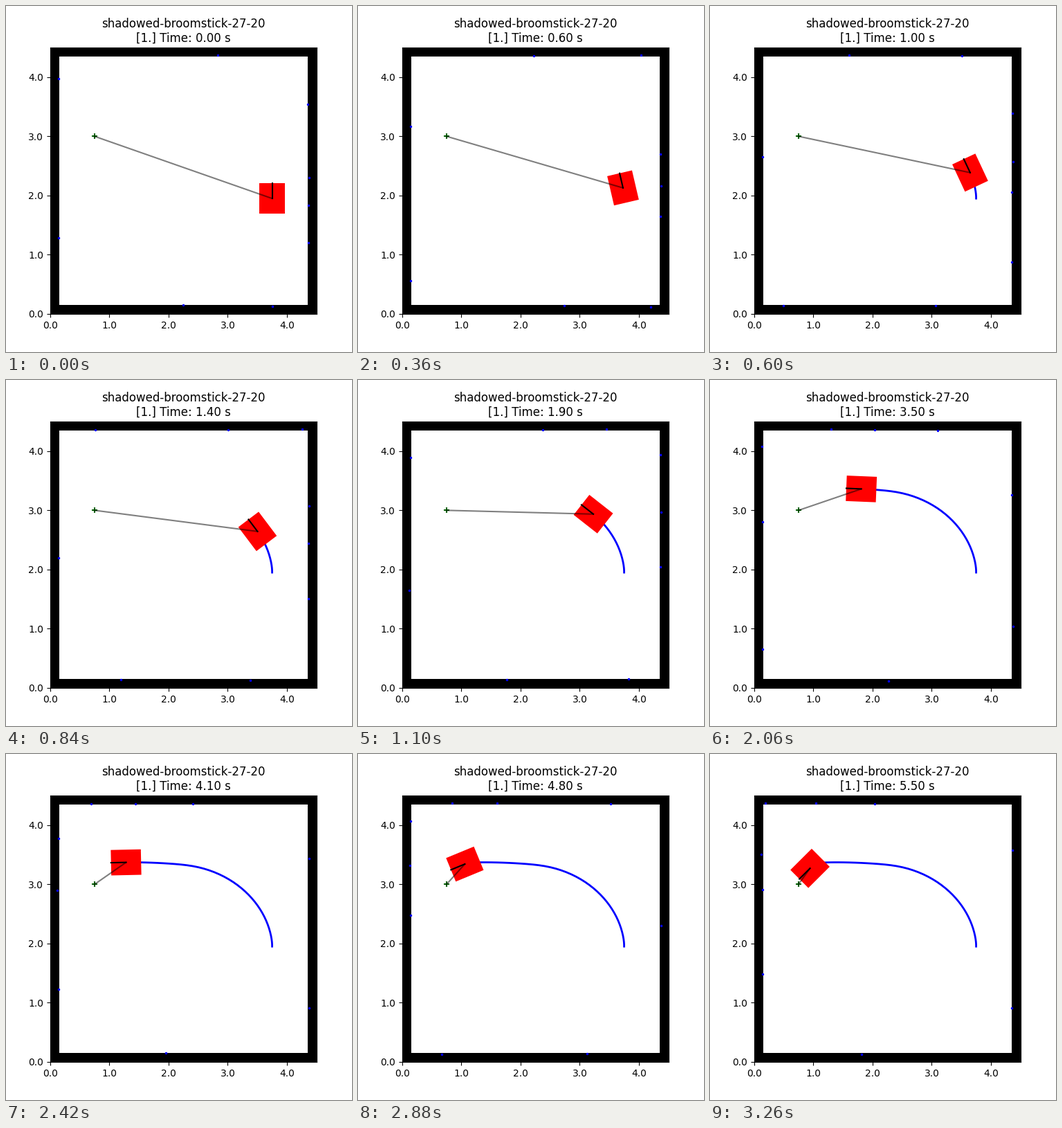
These frames come from a looping animation (500x500 px, 3280 ms). A matplotlib script:

```python
import numpy as np
import matplotlib.pyplot as plt
from matplotlib.animation import FuncAnimation
from matplotlib.patches import Polygon, Rectangle

ARENA, WALL = 4.5, 0.15
LENGTH, WIDTH = 0.508, 0.43
START, GOAL = np.array([3.75, 1.95]), np.array([0.75, 3.0])
STEPS, DT = 56, 0.1
TICK_MS, LOOP_MS = 20, 3280


def speed(t):
    """Pull away at 1 m/s², cruise up to 1 m/s, brake to a crawl."""
    return np.interp(t, [0, 0.66, 3, 3.72, 4.525], [0, 0.66, 1, 1, 0.195])


def turn_rate(t):
    """Degrees per second: steady left turn, nearly straight, left again."""
    return np.interp(t, [0, 0.32, 2.8, 3.2, 4.1, 4.2], [0, 29.8, 29.8, 6, 6, 32.1])


def drive():
    """Euler steps of a unicycle; each step moves along the heading before it."""
    mid = (np.arange(STEPS - 1) + 0.5) * DT
    turns = np.append(0, np.cumsum(turn_rate(mid) * DT))
    heading = np.radians(90 + turns)
    ahead = np.stack([np.cos(heading), np.sin(heading)], axis=1)
    moves = ahead[:-1] * (speed(mid) * DT)[:, None]
    path = START + np.vstack([np.zeros(2), np.cumsum(moves, axis=0)])
    return path, heading


path, heading = drive()
BEAMS = np.pi + np.radians(39.78) * np.arange(-4, 5)


def lidar(pos, a, k):
    """Points where the beams end, slightly inside the walls."""
    d = np.stack([np.cos(a + BEAMS), np.sin(a + BEAMS)], axis=1)
    limit = np.where(d > 0, ARENA - WALL, WALL)
    reach = ((limit - pos) / d).min(axis=1)
    reach += np.random.default_rng(k).uniform(0, 0.03, len(BEAMS))
    return pos + d * reach[:, None]


fig, ax = plt.subplots(figsize=(5, 5), dpi=100)
ax.set_aspect("equal")
ax.set(xlim=(0, ARENA), ylim=(0, ARENA), xticks=range(5), yticks=range(5))
ax.xaxis.set_major_formatter("{x:.1f}")
ax.yaxis.set_major_formatter("{x:.1f}")

for edge in (0, ARENA - WALL):
    ax.add_patch(Rectangle((0, edge), ARENA, WALL, color="k", lw=0))
    ax.add_patch(Rectangle((edge, 0), WALL, ARENA, color="k", lw=0))

trail, = ax.plot([], [], "b", lw=2, zorder=1.2)
body = ax.add_patch(Polygon(np.zeros((4, 2)), fc="r", lw=0, zorder=1.5))
ax.plot(*GOAL, "+", color="darkgreen", ms=6, mew=1.5)
to_goal, = ax.plot([], [], "k", lw=1.5, alpha=0.5)
nose, = ax.plot([], [], "k", lw=1.5)
hits, = ax.plot([], [], "bo", ms=1.5)
title = ax.set_title("")

CORNERS = np.array([[1, 1], [-1, 1], [-1, -1], [1, -1]]) * [LENGTH / 2, WIDTH / 2]


def step_at(ms):
    # steps alternate between 20 ms and 100 ms
    return 2 * (ms // 120) + (ms % 120 >= 20)


def update(frame):
    k = step_at(frame * TICK_MS)
    pos, a = path[k], heading[k]
    c, s = np.cos(a), np.sin(a)
    tip = pos + LENGTH / 2 * np.array([c, s])
    body.set_xy(pos + CORNERS @ np.array([[c, s], [-s, c]]))
    trail.set_data(*path[:k + 1].T)
    to_goal.set_data(*zip(pos, GOAL))
    nose.set_data(*zip(pos, tip))
    hits.set_data(*lidar(pos, a, k).T)
    title.set_text(f"shadowed-broomstick-27-20\n[1.] Time: {k * DT:.2f} s")
    return trail, body, to_goal, nose, hits, title


anim = FuncAnimation(fig, update, frames=LOOP_MS // TICK_MS, interval=TICK_MS,
                     repeat=True, repeat_delay=0)
plt.show()
```
